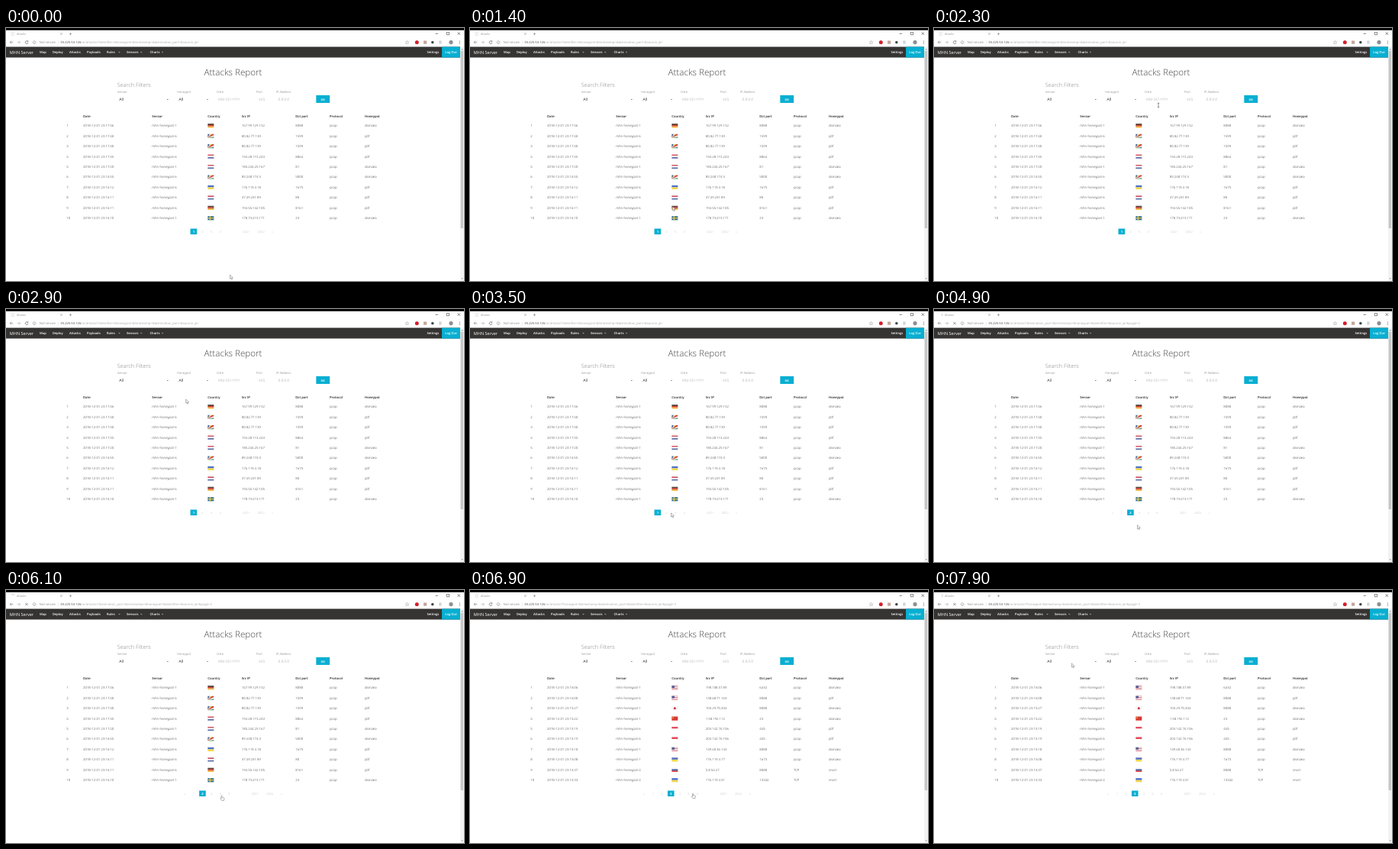
An HTML page that plays this animation: 600x331 px, repeating every 8000 ms.

```html
<!DOCTYPE html>
<html lang="en">
<head>
<meta charset="utf-8">
<title>Attacks Report</title>
<style>
html, body { margin: 0; width: 100%; height: 100%; overflow: hidden; background: #fff; }
svg { display: block; width: 100%; height: 100%; }
text { font-family: "Open Sans", "Noto Sans", sans-serif; text-rendering: geometricPrecision; white-space: pre; }
</style>
</head>
<body>
<svg id="stage" viewBox="0 0 600 331" xmlns="http://www.w3.org/2000/svg"></svg>
<script>
const LOOP = 8000;
const STEP = 100;
const CYAN = '#08afd1';
const stage = document.getElementById('stage');

const rect = (x, y, w, h, fill) =>
  `<rect x="${x}" y="${y}" width="${w}" height="${h}" fill="${fill}"/>`;
const line = (d, color, width = 0.6) =>
  `<path d="${d}" fill="none" stroke="${color}" stroke-width="${width}"/>`;
const text = (x, y, str, size, fill, weight = 400, anchor = 'start') =>
  `<text x="${x}" y="${y}" font-size="${size}" fill="${fill}" font-weight="${weight}" text-anchor="${anchor}">${str.replace(/&/g, '&amp;')}</text>`;
const caret = (x, y, fill, r = 1.2) =>
  `<path d="M${x - r} ${y}h${2 * r}l${-r} ${r}z" fill="${fill}"/>`;
const group = (id, content) => `<g id="${id}">${content}</g>`;

function browserBar() {
  return rect(0, 0, 600, 3, '#000') +
    text(14, 9.3, 'Attacks', 3.6, '#888') +
    line('M71.2 6.4l2.4 2.4m0-2.4l-2.4 2.4', '#777', 0.5) +
    line('M82.8 7.7h3.4m-1.7-1.7v3.4', '#666', 0.5) +
    line('M562.5 7.4h3.4M577.3 5.6h3.2v3.2h-3.2zM591.6 5.7l3.2 3.2m0-3.2l-3.2 3.2', '#333') +
    line('M9.4 18.7h-4.2m1.9-1.9l-1.9 1.9l1.9 1.9', '#555', 0.5) +
    line('M14.4 18.7h4.2m-1.9-1.9l1.9 1.9l-1.9 1.9', '#999', 0.5) +
    line('M37.2 16.8a1.9 1.9 0 1 0 .01 0M37.2 18.4v1.3', '#777', 0.5) +
    text(43.8, 20.3, 'Not secure', 4.2, '#888') +
    line('M68.3 16.6v4.4', '#ccc', 0.4) +
    text(71.3, 20.3, '35.225.53.126', 4.15, '#444') +
    line('M525.5 16.5l.7 1.6 1.7.1-1.3 1.1.5 1.7-1.6-1-1.6 1 .5-1.7-1.3-1.1 1.7-.1z', '#888', 0.4) +
    '<circle cx="538.3" cy="18.7" r="2.5" fill="#d3202d"/>' +
    rect(547, 16.6, 4.2, 4.2, '#c7a59b') +
    '<circle cx="558.8" cy="18.8" r="1.8" fill="#3f4648"/>' +
    rect(567.2, 16.6, 3.4, 4.1, '#d3d6d8') +
    '<circle cx="583" cy="18.7" r="2.6" fill="#8b9194"/>' +
    [17, 18.7, 20.4].map(y => `<circle cx="594.3" cy="${y}" r=".5" fill="#555"/>`).join('');
}

function navBar() {
  const items = [[44, 'Map'], [61, 'Deploy'], [83, 'Attacks'], [106, 'Payloads'], [132, 'Rules'],
    [158, 'Sensors'], [188.5, 'Charts'], [551.5, 'Settings']];
  return rect(0, 24.6, 595, 14, '#363433') +
    rect(571, 24.6, 24, 14, CYAN) +
    text(4.8, 33.8, 'MHN Server', 5.55, '#fff') +
    items.map(([x, s]) => text(x, 33.3, s, 4.1, '#fff', 600)).join('') +
    [148.5, 177.2, 205].map(x => caret(x, 31.2, '#bbb')).join('') +
    text(583, 33.3, 'Log Out', 4.1, '#fff', 600, 'middle') +
    rect(595, 24.6, 5, 306.4, '#f3f3f3') +
    rect(595.6, 30, 3.4, 232, '#c6c6c6') +
    '<path d="M596.5 28.4h2.2l-1.1-1.4z" fill="#777"/>' +
    caret(597.6, 327.4, '#555', 1.1);
}

function filters() {
  const labels = [[146, 'Sensor'], [224, 'Honeypot'], [276.3, 'Date'], [328, 'Port'], [354, 'IP Address']];
  const hints = [[278, 'MM-DD-YYYY'], [331, '445'], [356.5, '8.8.8.8']];
  return text(297.5, 61.8, 'Attacks Report', 11.65, '#444', 300, 'middle') +
    text(145.8, 76.6, 'Search Filters', 7.3, '#808080', 300) +
    labels.map(([x, s]) => text(x, 84.7, s, 4.1, '#666', 300)).join('') +
    [148.3, 226.5].map(x => text(x, 95, 'All', 5, '#222')).join('') +
    [211.8, 264].map(x => caret(x, 93, '#444', 1)).join('') +
    hints.map(([x, s]) => text(x, 95.2, s, 4.8, '#999', 300)).join('') +
    rect(406.3, 88, 17.8, 10, CYAN) +
    text(415.2, 94.5, 'GO', 3.5, '#fff', 700, 'middle');
}

const FLAG_H = 5.2;
const bands = (...colors) =>
  colors.map((c, i) => rect(0, i * FLAG_H / colors.length, 8, FLAG_H / colors.length, c)).join('');
const FLAGS = {
  DE: bands('#4a3a30', '#d03a30', '#ecb53c'),
  NL: bands('#cf5563', '#fff', '#5a70ab'),
  UA: bands('#4f70c6', '#f0d84e'),
  RU: bands('#f4f4f4', '#3a55aa', '#d03a40'),
  ID: bands('#e34d60', '#fff'),
  JP: bands('#f7f3f4') + '<circle cx="4" cy="2.6" r="1.5" fill="#c8304b"/>',
  CN: bands('#d83a32') + rect(1, 0.9, 1.5, 1.5, '#f2c230'),
  SE: bands('#34729f') + rect(2.4, 0, 1.3, FLAG_H, '#e8cb45') + rect(0, 2, 8, 1.2, '#e8cb45'),
  SC: bands('#fff') + '<path d="M0 5.2V0h2.6z" fill="#4a659f"/><path d="M0 5.2L2.6 0h2.7z" fill="#f0d96a"/>' +
    '<path d="M0 5.2L5.3 0H8v1.7z" fill="#d0504a"/><path d="M0 5.2L8 3.5v1.7z" fill="#4b9260"/>',
  US: bands('#cf5a66', '#fff', '#cf5a66', '#fff', '#cf5a66', '#fff', '#cf5a66') + rect(0, 0, 3.7, 3, '#55639a')
};

// time, sensor, country, address, port, honeypot
const FIRST = `17:46 1 DE 167.99.129.132 8088 dionaea
17:40 6 SC 80.82.77.139 1599 p0f
17:40 6 SC 80.82.77.139 1599 p0f
17:35 6 NL 194.28.115.243 8864 p0f
17:20 1 NL 185.244.25.167 81 dionaea
16:55 6 SC 89.248.174.3 5000 dionaea
16:12 6 UA 176.119.4.18 1675 p0f
16:11 6 NL 37.49.231.89 80 p0f
16:11 6 DE 194.55.142.105 8161 p0f
16:10 1 SE 178.73.215.171 23 dionaea`;
const LATER = `16:06 1 US 198.108.57.89 6432 dionaea
16:00 6 US 138.68.71.163 8088 p0f
15:27 1 JP 103.29.70.204 8088 dionaea
15:22 1 CN 1.58.192.112 23 dionaea
15:19 6 ID 203.142.76.106 445 p0f
15:19 6 ID 203.142.76.106 445 p0f
15:18 1 US 139.60.36.143 8088 dionaea
15:08 1 UA 176.119.4.77 1673 dionaea
14:37 4 RU 5.8.54.27 8088 snort
14:33 4 UA 176.119.4.51 13342 snort`;
const COLUMNS = [101, 191.3, 264.3, 308.8, 379.3, 424, 470];

function tableHead() {
  return ['Date', 'Sensor', 'Country', 'Src IP', 'Dst port', 'Protocol', 'Honeypot']
    .map((s, i) => text(COLUMNS[i], 116.6, s, 4.2, '#222', 600)).join('') +
    Array.from({ length: 10 }, (_, i) => text(79.3, rowY(i), String(i + 1), 4.3, '#222', 300)).join('');
}

function rowY(i) { return 129.2 + i * 13.44; }

function tableRows(data) {
  return data.split('\n').map((row, i) => {
    const [time, sensor, country, ip, port, pot] = row.split(' ');
    const y = rowY(i);
    const cells = [`2018-12-01 23:${time}`, `mhn-honeypot-${sensor}`, '', ip, port,
      pot === 'snort' ? 'TCP' : 'pcap', pot];
    return cells.map((s, c) => s && text(COLUMNS[c], y, s, 4.3, '#222', 300)).join('') +
      `<g transform="translate(264.3 ${y - 4})">${FLAGS[country]}</g>`;
  }).join('');
}

function pager(page) {
  const pitch = 11.6;
  const start = [245.8, 234.2, 228.4][page - 1];
  const labels = page > 1 ? ['«'] : [];
  for (let n = 1; n <= page + 3; n++) labels.push(String(n));
  labels.push('…');
  const end = start + (labels.length - 1) * pitch;
  const faint = (x, s) => text(x, 267.7, s, 4, '#b4b4b4', 300, 'middle');
  return labels.map((s, i) => {
    const x = start + i * pitch;
    return s === String(page)
      ? rect(x - 4.3, 262.5, 8.6, 7.5, CYAN) + text(x, 267.8, s, 4.1, '#fff', 700, 'middle')
      : faint(x, s);
  }).join('') + faint(end + 22.5, '2021') + faint(end + 42, '2022') + faint(end + 57, '»');
}

const QUERIES = [
  'identifier=&honeypot=&timestamp=&destination_port=&source_ip=',
  'destination_port=&timestamp=&honeypot=&identifier=&source_ip=&page=2',
  'honeypot=&timestamp=&destination_port=&identifier=&source_ip=&page=3'
];
const CURSORS = {
  arrow: '<path d="M0 0v5.2l1.2-1.1.9 2 .9-.4-.9-1.9h1.7z" fill="#fff" stroke="#555" stroke-width=".45"/>',
  beam: line('M-1.2-2.7h2.4M0-2.7v5.4M-1.2 2.7h2.4', '#444', 0.6),
  hand: '<path d="M.2.4q.6-.8 1 0v2l2.6.6q.5.3.3 1.2l-.5 2.2H.9L-1 4q.2-.8 1.2-.1z" fill="#fff" stroke="#555" stroke-width=".45"/>'
};

stage.innerHTML = rect(0, 0, 600, 331, '#fff') + browserBar() + navBar() + filters() + tableHead() +
  group('rowsFirst', tableRows(FIRST)) + group('rowsLater', tableRows(LATER)) +
  QUERIES.map((q, i) => group('page' + (i + 1), pager(i + 1) + text(98.3, 20.3, '/ui/attacks/?' + q, 4.15, '#aaa'))).join('') +
  group('idle', line('M28.6 17.5a1.9 1.9 0 1 0 .4 1.6M28.9 16.3v1.5h-1.5', '#555') +
    line('M7.6 5.9h1.8l.9.9v2.9H7.6z', '#bbb', 0.4)) +
  group('busy', line('M25.4 17.1l3.2 3.2m0-3.2l-3.2 3.2', '#555') +
    '<g id="spinner">' + line('M0-2A2 2 0 0 1 2 0', '#9aa7b5', 0.6) + '</g>') +
  group('cursor', Object.entries(CURSORS).map(([id, art]) => group(id, art)).join(''));

const el = id => document.getElementById(id);
const show = (id, on) => el(id).setAttribute('visibility', on ? 'visible' : 'hidden');

// time, x, y, shape from this time on
const PATH = [
  [0, 293.5, 323, 'arrow'], [1100, 293.5, 323, 'arrow'], [1600, 250, 185, 'arrow'],
  [2000, 290, 104, 'beam'], [2300, 294, 101, 'beam'], [2500, 226, 66, 'arrow'],
  [2600, 226, 66, 'arrow'], [3500, 263.5, 266.8, 'arrow'], [3600, 263.5, 266.8, 'hand'],
  [3800, 263.5, 266.8, 'hand'], [3900, 263.5, 272, 'arrow'], [4100, 263.7, 286, 'arrow'],
  [4700, 264.5, 284, 'arrow'], [5600, 280, 273, 'arrow'], [5700, 281, 270, 'hand'],
  [6100, 281.8, 269, 'hand'], [6500, 290, 276.5, 'arrow'], [6700, 291.3, 266.3, 'arrow'],
  [6900, 291.3, 266.3, 'hand'], [7000, 291.3, 266.3, 'arrow'], [7700, 210, 104, 'arrow'],
  [7900, 180.3, 95.8, 'arrow'], [LOOP, 180.3, 95.8, 'arrow']
];

function moveCursor(t) {
  const i = PATH.findIndex(k => k[0] > t) - 1;
  const [t0, x0, y0, shape] = PATH[i];
  const [t1, x1, y1] = PATH[i + 1];
  const p = (t - t0) / (t1 - t0);
  const e = p * p * (3 - 2 * p);
  el('cursor').setAttribute('transform', `translate(${x0 + (x1 - x0) * e} ${y0 + (y1 - y0) * e})`);
  for (const id in CURSORS) el(id).setAttribute('display', id === shape ? 'inline' : 'none');
}

function render(now) {
  const t = Math.floor((now % LOOP) / STEP) * STEP;
  const page = t < 3900 ? 1 : t < 6300 ? 2 : 3;
  const busy = (t >= 3900 && t < 6400) || t >= 7000;
  for (let n = 1; n <= 3; n++) show('page' + n, n === page);
  show('rowsFirst', page < 3);
  show('rowsLater', page === 3);
  show('idle', !busy);
  show('busy', busy);
  el('spinner').setAttribute('transform', `translate(9 7.8) rotate(${-t * 0.36})`);
  moveCursor(t);
}

const began = performance.now();
function tick() {
  render(performance.now() - began);
  requestAnimationFrame(tick);
}
tick();
</script>
</body>
</html>
```
